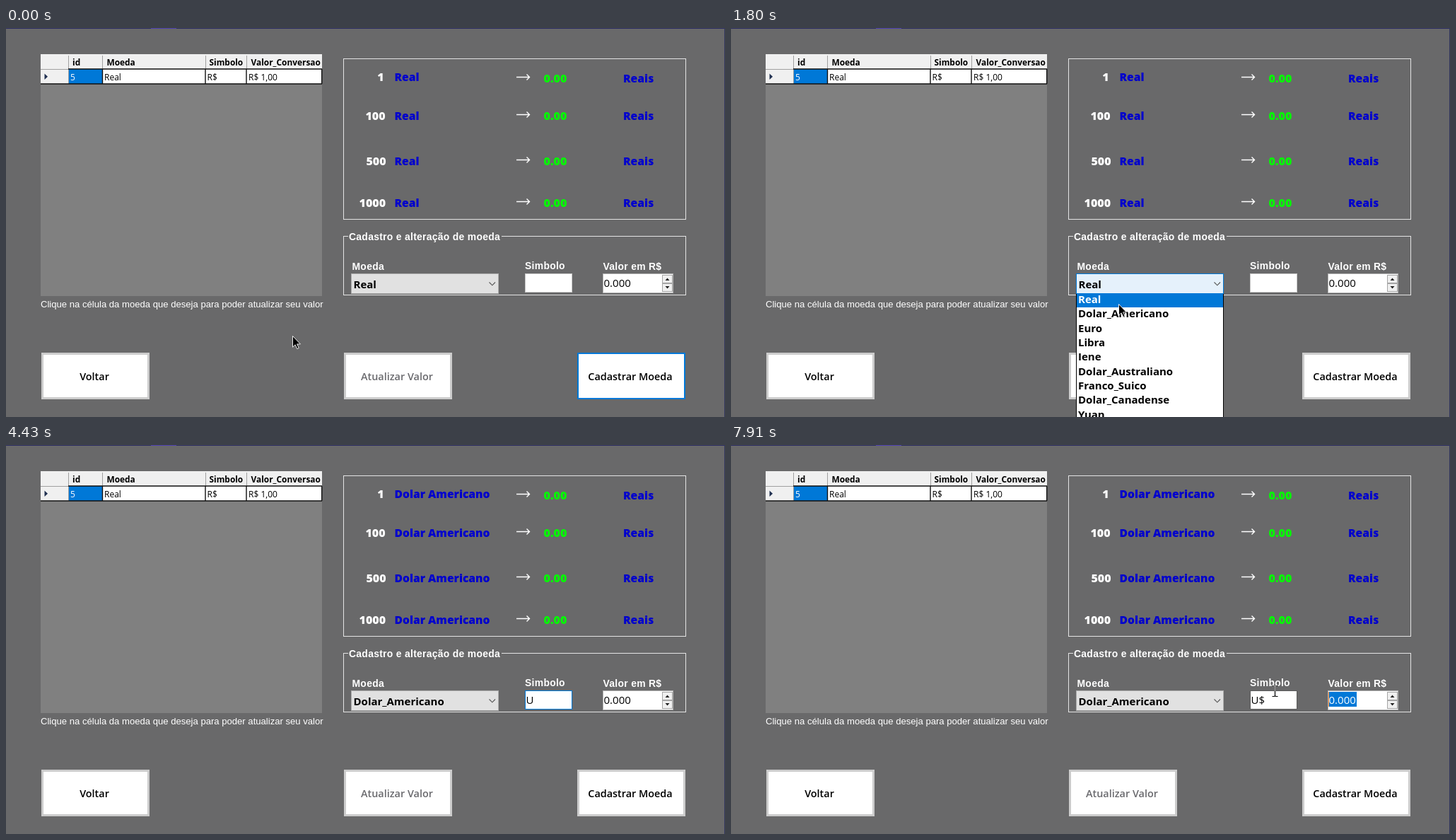
Recreate the animation shown at these times as an HTML page. Size 1017 by 550 pixels, loop 7990 ms.

```html
<!DOCTYPE html>
<html lang="pt-BR">
<head>
<meta charset="utf-8">
<title>Cadastro de moeda</title>
<style>
html, body { margin: 0; width: 100%; height: 100%; overflow: hidden; background: #69696a; }
svg { display: block; width: 1017px; height: 550px; }
rect, .line { shape-rendering: crispEdges; }
text { font-family: "Open Sans", "Noto Sans", sans-serif; white-space: pre; }
.frame { fill: none; stroke: #e4e4e4; }
.label { font: bold 13.9px "Liberation Sans", sans-serif; letter-spacing: .3px; fill: #fff; }
.hint { font: 13.1px "Liberation Sans", sans-serif; fill: #fff; }
.head { font-size: 11.9px; font-weight: 700; }
.cell { font-size: 12px; }
.num, .name { font-size: 16px; font-weight: 800; }
.num { fill: #fff; text-anchor: end; }
.name { font-size: 15.6px; fill: #0000cd; }
.value { fill: #0f0; text-anchor: start; }
.item { font-size: 15px; font-weight: 700; }
.field { font-size: 15px; }
.btn { font-size: 14.4px; font-weight: 600; text-anchor: middle; }
#beam { mix-blend-mode: difference; }
</style>
</head>
<body>
<svg viewBox="0 0 1017 550">
  <defs>
    <clipPath id="listClip"><rect x="488" y="376" width="210" height="174"/></clipPath>
    <clipPath id="selClip"><rect id="selArea" x="845" y="349" width="40" height="21"/></clipPath>
  </defs>
  <rect width="1017" height="550" fill="#69696a"/>
  <rect width="1017" height="1" fill="#282a60"/>
  <rect x="205" width="36" height="1" fill="#4a3cb4"/>
  <rect x="1016" width="1" height="550" fill="#34375f"/>

  <rect x="49" y="37" width="398" height="342" fill="#808080"/>
  <rect x="49" y="37" width="398" height="42" fill="#f0f0f0"/>
  <rect x="136" y="58" width="311" height="21" fill="#fff"/>
  <rect x="88" y="58" width="48" height="21" fill="#0078d7"/>
  <path class="line" d="M88.5 39V58M136.5 39V58M282.5 39V58M340.5 39V58M49 58.5H88M88.5 58V79" stroke="#a0a0a0"/>
  <path d="M88 58H447M49 79H447M136.5 58V79M282 58V79M340 58V79M446.7 58V79" stroke="#111" stroke-width="1.4"/>
  <path d="M54.5 64.5V73L59 68.7Z" fill="#203050"/>
  <g class="head">
    <text x="94" y="53">id</text><text x="142.5" y="53">Moeda</text>
    <text x="287.5" y="53">Simbolo</text><text x="346.5" y="53">Valor_Conversao</text>
  </g>
  <g class="cell">
    <text x="91" y="74" fill="#fff">5</text><text x="139" y="74">Real</text>
    <text x="284.5" y="74">R$</text><text x="343" y="74">R$ 1,00</text>
  </g>
  <text class="hint" x="49" y="395">Clique na célula da moeda que deseja para poder atualizar seu valor</text>

  <rect class="frame" x="477.5" y="43.5" width="484" height="227"/>
  <path class="frame line" d="M484 294.5H477.5V377.5H961.5V294.5H701"/>
  <text class="label" x="485" y="300">Cadastro e alteração de moeda</text>
  <text class="label" x="489.5" y="341.5">Moeda</text>
  <text class="label" x="734" y="340.5">Simbolo</text>
  <text class="label" x="844.5" y="341.5">Valor em R$</text>
  <g id="rows"></g>

  <rect id="combo" x="488.5" y="347.5" width="208" height="28"/>
  <path d="M683.5 359.5L687.8 363.8L692 359.5" fill="none" stroke="#555" stroke-width="1.1"/>
  <text id="choice" class="item" x="491.5" y="367.5"></text>

  <rect id="box" x="734.5" y="347.5" width="66" height="26" fill="#fff"/>
  <text id="symbol" class="field" x="735.5" y="366"></text>
  <rect id="caret" y="349" width="1" height="21"/>

  <rect x="844.5" y="347.5" width="99" height="27" fill="#fff" stroke="#b0b0b0"/>
  <path class="line" d="M928.5 349.5H942.5V360.5H928.5ZM928.5 361.5H942.5V372.5H928.5Z" fill="#f0f0f0" stroke="#a5a5a5"/>
  <path d="M932.5 357L935.5 353.5L938.5 357ZM932.5 365L935.5 368.5L938.5 365Z" fill="#222"/>
  <text class="field" x="845.5" y="366">0.000</text>
  <g id="sel" clip-path="url(#selClip)">
    <rect x="845" y="349" width="40" height="21" fill="#0078d7"/>
    <text class="field" x="845.5" y="366" fill="#fff">0.000</text>
    <rect x="845" y="349" width="1" height="21" fill="#ff8728"/>
  </g>

  <g id="buttons"></g>

  <g id="list" clip-path="url(#listClip)">
    <g id="items">
      <rect x="488.5" y="374.5" width="208" height="227" fill="#fff" stroke="#000"/>
      <rect id="mark" x="489" width="207" height="20" fill="#0078d7"/>
    </g>
  </g>

  <path id="arrow" d="M.5.5V16.2L4.1 12.8L6.8 18.6L9.2 17.5L6.6 11.9H11.4Z" fill="#000" stroke="#fff" stroke-width=".9"/>
  <path id="beam" d="M-4-7.5H-1L0-6.5L1-7.5H4M-4 7.5H-1L0 6.5L1 7.5H4M0-6.5V6.5" fill="none" stroke="#fff" stroke-width="1.2"/>
</svg>
<script>
const LOOP = 7990, ROW = 20.35;
const $ = id => document.getElementById(id);
const set = (el, attrs) => { for (const k in attrs) el.setAttribute(k, attrs[k]); return el; };
const show = (el, on) => { el.style.display = on ? '' : 'none'; };
function add(parent, tag, attrs, text) {
  const el = set(document.createElementNS('http://www.w3.org/2000/svg', tag), attrs);
  if (text) el.textContent = text;
  return parent.appendChild(el);
}

// amount, its right edge, text centre, value centre, arrow centre
const names = [
  ['1', 534.5, 69, 71, 69], ['100', 536.5, 124, 124, 122],
  ['500', 537.5, 188, 188, 186], ['1000', 537, 247, 247, 245]
].map(([amount, right, y, vy, ay]) => {
  const g = $('rows');
  add(g, 'text', { class: 'num', x: right, y: y + 6 }, amount);
  add(g, 'text', { class: 'num value', x: 760.5, y: vy + 6 }, '0.00');
  add(g, 'text', { class: 'name', x: 873, y: vy + 6 }, 'Reais');
  add(g, 'path', { d: `M722 ${ay + .5}H740.5M736.5 ${ay - 3.5}L740.5 ${ay + .5}L736.5 ${ay + 4.5}`,
    fill: 'none', stroke: '#fff', 'stroke-width': 1.4 });
  return add(g, 'text', { class: 'name', x: 549.5, y: y + 6 });
});

const frames = [[50, 'Voltar', '#000'], [478, 'Atualizar Valor', '#6a6a6e'], [808, 'Cadastrar Moeda', '#000']]
  .map(([x, label, fill]) => {
    const g = $('buttons');
    const edge = add(g, 'rect', { x, y: 459, width: 153, height: 66, fill: '#ccc' });
    const face = add(g, 'rect', { fill: '#fff' });
    add(g, 'text', { class: 'btn', x: x + 75, y: 497.5, fill }, label);
    return (color, w) => {
      set(edge, { fill: color });
      set(face, { x: x + w, y: 459 + w, width: 153 - 2 * w, height: 66 - 2 * w });
    };
  });
frames.forEach(paint => paint('#ccc', 3));

const options = ['Real', 'Dolar_Americano', 'Euro', 'Libra', 'Iene', 'Dolar_Australiano', 'Franco_Suico',
  'Dolar_Canadense', 'Yuan', 'Peso_Argentino', 'Peso_Chileno']
  .map((s, i) => add($('items'), 'text', { class: 'item', x: 491, y: 389 + i * ROW }, s));

// time, x, y
const path = [
  [290, 405, 435], [480, 436, 424], [700, 506, 391], [930, 548, 368], [1080, 549, 361],
  [1550, 549, 361], [1780, 548, 388], [2050, 547, 409], [2200, 547, 409], [2450, 598, 404],
  [2720, 698, 383], [2970, 762, 362], [3170, 771, 357], [6870, 790, 364], [7000, 812, 385],
  [7120, 862, 370], [7250, 917, 359], [7340, 905, 355], [7490, 905, 355], [7640, 842, 353],
  [7790, 731, 349], [7910, 769, 348]
];
const slide = [[1130, -160], [1190, -95], [1250, -2 * ROW], [1289, -2 * ROW], [1290, 0]];

function at(keys, t) {
  const i = keys.findIndex(k => k[0] > t);
  if (i < 0) return keys[keys.length - 1].slice(1);
  if (!i) return keys[0].slice(1);
  const a = keys[i - 1], b = keys[i], u = (t - a[0]) / (b[0] - a[0]);
  return a.slice(1).map((v, j) => v + (b[j + 1] - v) * u);
}
const within = (v, a, b) => v >= a && v < b;
const blend = (a, b, u) => `rgb(${a.map((v, i) => Math.round(v + (b[i] - v) * u))})`;
const ramp = (t, a, b) => Math.min(1, Math.max(0, (t - a) / (b - a)));

const carets = [[3170, 3720, 737], [3880, 4430, 747], [4990, 5490, 747], [5890, 6420, 756], [6950, 7490, 756]];
const stops = [845, 854.6, 858.6, 867, 875.7, 885];
const GREY = [225, 225, 225], HOT = [229, 241, 251], PRESSED = [204, 228, 247];

function draw(t) {
  const [x, y] = at(path, t);
  const chosen = t >= 2200;

  names.forEach(el => { el.textContent = chosen ? 'Dolar Americano' : 'Real'; });
  $('choice').textContent = chosen ? 'Dolar_Americano' : 'Real';
  if (t < 1290) frames[2]('#0078d7', 2);
  else frames[2]('#ccc', 3);

  const fade = ramp(t, 2250, 2600);
  set($('combo'), {
    fill: chosen ? blend(PRESSED, GREY, fade) : blend(GREY, HOT, ramp(t, 960, 1080)),
    stroke: chosen ? blend([0, 84, 153], [173, 173, 173], fade)
      : blend([173, 173, 173], [0, 120, 215], ramp(t, 960, 1080))
  });

  show($('list'), within(t, 1130, 2200));
  set($('items'), { transform: `translate(0 ${at(slide, t)[0]})` });
  const hot = t < 1290 ? -1 : y >= 394 ? 1 : 0;
  show($('mark'), hot >= 0);
  set($('mark'), { y: 375 + Math.max(0, hot) * ROW });
  options.forEach((el, i) => set(el, { fill: i === hot ? '#fff' : '#000' }));

  set($('box'), { stroke: t < 3070 ? '#c8c8c8' : t < 7490 ? '#0078d7' : '#5a5a5a' });
  $('symbol').textContent = t < 3880 ? '' : t < 5890 ? 'U' : 'U$';
  const caret = carets.find(c => within(t, c[0], c[1]));
  show($('caret'), caret);
  if (caret) set($('caret'), { x: caret[2] });

  // dragging left from the end of the number
  const dragging = t >= 7490;
  const reach = Math.min(...(t >= 7790 ? [845] : stops.filter(s => s >= x - 4)), 885);
  show($('sel'), dragging && reach < 885);
  set($('selArea'), { x: reach, width: 885 - reach });

  const typing = within(t, 3880, 6870);
  const overText = dragging || (within(y, 347, 375) && (within(x, 734, 801) || within(x, 844, 928)));
  show($('arrow'), !typing && !overText);
  show($('beam'), !typing && overText);
  set($('arrow'), { transform: `translate(${Math.round(x)} ${Math.round(y)})` });
  set($('beam'), { transform: `translate(${Math.round(x) + .5} ${Math.round(y)})` });
}

const start = performance.now();
function tick() {
  draw((performance.now() - start) % LOOP);
  requestAnimationFrame(tick);
}
tick();
</script>
</body>
</html>
```
